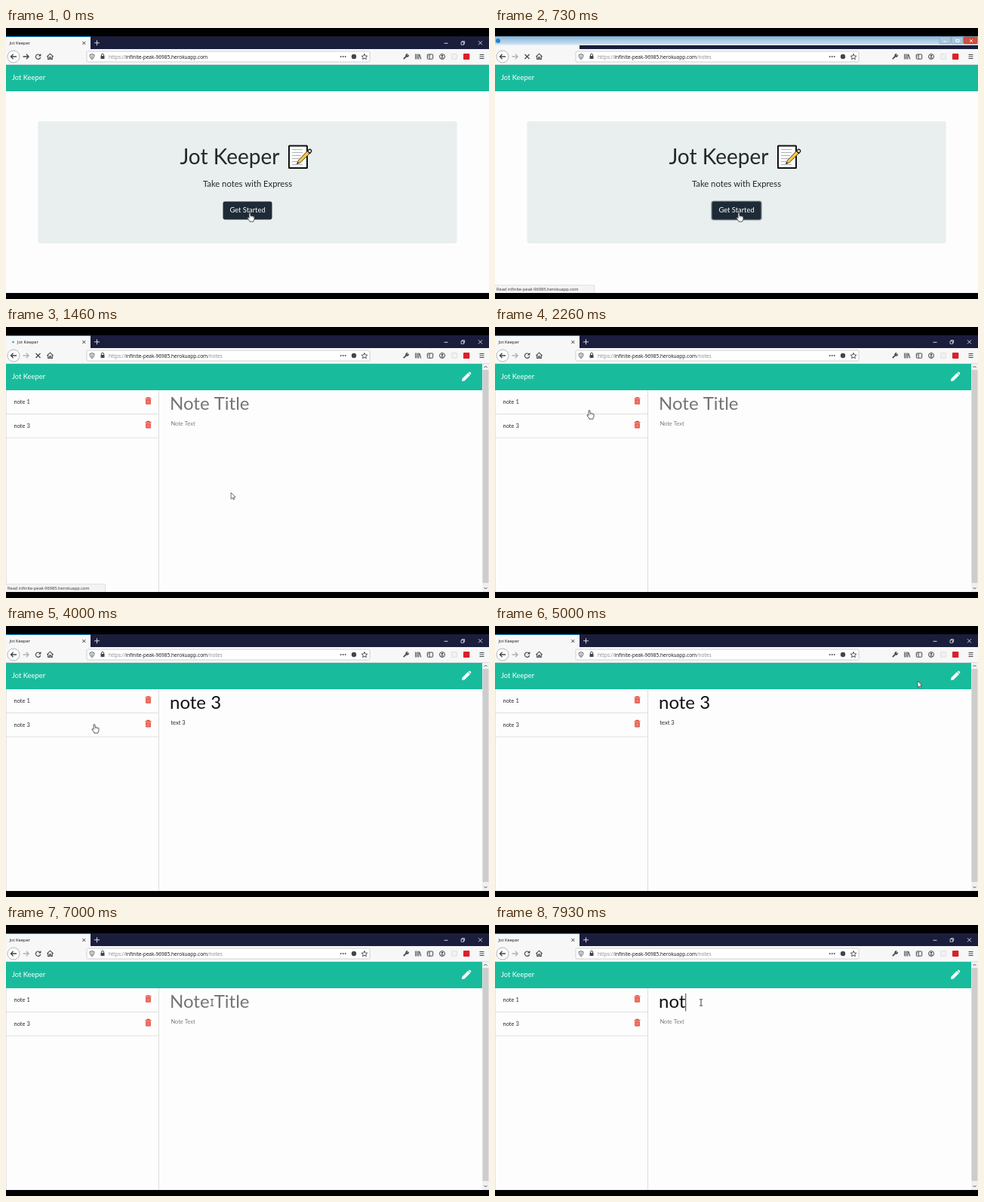
Write an HTML page with a canvas that moves like this. It is 640 by 360 pixels and loops after 8000 ms.

```html
<!DOCTYPE html>
<html lang="en">
<head>
<meta charset="utf-8">
<title>Jot Keeper</title>
<style>
  html, body { margin: 0; width: 100%; height: 100%; overflow: hidden; background: #000; }
  canvas { display: block; width: 640px; height: 360px; }
</style>
</head>
<body>
<canvas id="stage" width="640" height="360"></canvas>
<script>
const ctx = document.getElementById('stage').getContext('2d');
const LOOP = 8000;
const LATO = 'Lato, sans-serif', UI = '"Open Sans", sans-serif';
const APP = 'Jot Keeper', HOST = 'infinite-peak-96985.herokuapp.com';
const INK = '#25282c', ICON = '#45464b', TEAL = '#18bc9c', PAGE = '#fdfdfd';
const TOP = 11, NAV = 49, BODY = 84, BOTTOM = 352;

const ticks = [0, 60, 200, 400, 530, 730, 930, 1130, 1260, 1400, 1600, 1730, 1860, 2060, 2260, 2460, 2530];
for (let k = 20; k < 60; k++) ticks.push(Math.floor(k * 40 / 3 + (k > 39 ? 6.7 : 0)) * 10);

// Pointer hot spot: time, x, y
const path = [
  [0, 323, 246], [730, 323, 246], [930, 322, 233], [1260, 322, 233],
  [1730, 210, 172], [2060, 130, 115], [2260, 125, 111], [2460, 119, 103],
  [2930, 117, 102], [3330, 116, 129], [3600, 117, 131], [4400, 117, 131],
  [4660, 300, 106], [4930, 560, 73], [5060, 609, 64], [5400, 609, 64],
  [5660, 400, 100], [5930, 281, 116], [6330, 273, 103], [8000, 273, 103]
];

function pointerAt(t) {
  const i = path.findIndex(p => p[0] > t);
  const [t0, x0, y0] = path[i - 1], [t1, x1, y1] = path[i];
  const u = (t - t0) / (t1 - t0), e = u * u * (3 - 2 * u);
  return [x0 + (x1 - x0) * e, y0 + (y1 - y0) * e];
}

function rect(x, y, w, h, fill) {
  ctx.fillStyle = fill;
  ctx.fillRect(x, y, w, h);
}

function round(x, y, w, h, r, fill, stroke, width = 1) {
  ctx.beginPath();
  ctx.roundRect(x, y, w, h, r);
  paint(fill, stroke, width);
}

function circle(x, y, r, fill, stroke, width = 1) {
  ctx.beginPath();
  ctx.arc(x, y, r, 0, 7);
  paint(fill, stroke, width);
}

function paint(fill, stroke, width) {
  if (fill) { ctx.fillStyle = fill; ctx.fill(); }
  if (stroke) { ctx.strokeStyle = stroke; ctx.lineWidth = width; ctx.stroke(); }
}

// SVG path placed at x, y
function shape(d, x, y, fill, stroke, width = 1) {
  const p = new Path2D(d);
  ctx.save();
  ctx.translate(x, y);
  if (fill) { ctx.fillStyle = fill; ctx.fill(p); }
  if (stroke) { ctx.strokeStyle = stroke; ctx.lineWidth = width; ctx.stroke(p); }
  ctx.restore();
}

function text(s, x, y, size, color, family = LATO, align = 'left') {
  ctx.font = `${size}px ${family}`;
  ctx.fillStyle = color;
  ctx.textAlign = align;
  ctx.fillText(s, x, y);
  return x + ctx.measureText(s).width;
}

function tabStrip(s) {
  rect(0, TOP, 640, 28 - TOP, '#1b1d3c');
  rect(0, TOP, 112, 28 - TOP, '#f7f7f8');
  if (s.flash) {
    const g = ctx.createLinearGradient(0, TOP, 0, 23);
    g.addColorStop(0, '#7fb0d6');
    g.addColorStop(0.35, '#a3c6e2');
    g.addColorStop(0.8, '#c3daec');
    g.addColorStop(1, '#eaf2f8');
    rect(0, TOP, 640, 12, g);
    circle(4, 17, 3, '#1b86d8');
    round(589, 12, 15, 9, 1, '#a9c6dd', '#7d9db5', 0.6);
    round(605, 12, 15, 9, 1, '#a9c6dd', '#7d9db5', 0.6);
    round(621, 12, 18, 9, 1, '#d0503f', '#98392f', 0.6);
    shape('M-2 1H2', 596, 17, null, '#fff');
    shape('M-2-1.5H2V1.5H-2Z', 613, 17, null, '#fff');
    shape('M-1.7-1.7L1.7 1.7M1.7-1.7L-1.7 1.7', 631, 17, null, '#fff');
    return;
  }
  rect(0, TOP, 112, 1, '#1689d8');
  if (s.loading) circle(9.5, 20, 1.3, '#2a9be6');
  text(APP, s.loading ? 15 : 4.4, 22.2, 5.8, '#16171a', UI);
  shape('M-2-2L2 2M2-2L-2 2', 103.3, 20, null, '#333', 0.9);
  shape('M-3.5 0H3.5M0-3.5V3.5', 120.5, 19.8, null, '#e8e8ee', 0.9);
  shape('M-2.5 0H2.5', 583, 20.3, null, '#fff', 0.8);
  shape('M-2-1H1.5V2.5H-2ZM-.8-1V-2.2H2.6V1.3H1.5', 605, 19.8, null, '#fff', 0.7);
  shape('M-2.5-2.5L2.5 2.5M2.5-2.5L-2.5 2.5', 628.5, 19.8, null, '#fff', 0.8);
}

function toolbar(s) {
  rect(0, 28, 640, NAV - 28, '#f7f7f8');
  rect(0, NAV - 1, 640, 1, '#dcdde0');
  circle(10, 38, 8, '#fff', '#a5a5a9', 0.8);
  shape('M4 0H-3.5M-.4-3.2L-3.6 0L-.4 3.2', 10, 38, null, ICON, 1.3);
  shape('M-4 0H3.5M.4-3.2L3.6 0L.4 3.2', 26.5, 38, null, s.notesUrl ? '#b2b2b6' : ICON, 1.3);
  if (s.loading) {
    shape('M-3-3L3 3M3-3L-3 3', 42.5, 38, null, ICON, 1.2);
  } else {
    shape('M2.7-1.7A3.2 3.2 0 1 0 3.2 1', 42.5, 38, null, ICON, 1.2);
    shape('M3.9-4V-.4H.3Z', 42.5, 38, ICON);
  }
  shape('M-4.2.2L0-3.8L4.2.2M-2.8-.5V3.4H-.8V.8H.8V3.4H2.8V-.5', 58.5, 38, null, ICON, 1.1);

  round(107, 31, 375, 14, 1.5, '#fff', '#c4c4c8', 0.8);
  shape('M0-3.4L2.8-2.4C2.8.5 2 2.4 0 3.6C-2 2.4-2.8.5-2.8-2.4ZM0-2V2.2', 114, 38, null, ICON, 0.9);
  shape('M-1.6-.5V-1.6A1.6 1.6 0 0 1 1.6-1.6V-.5', 128, 37.5, null, ICON, 1);
  round(125.5, 37, 5, 4, 0.6, ICON);
  let x = text('https://', 136, 40.9, 6.55, '#85858a', UI);
  x = text(HOST, x, 40.9, 6.55, '#111114', UI);
  if (s.notesUrl) text('/notes', x, 40.9, 6.55, '#85858a', UI);
  for (const dx of [-3, 0, 3]) circle(446.7 + dx, 38, 0.95, ICON);
  circle(461, 38, 3.2, ICON);
  shape('M0-3.8L1.1-1.2L3.9-1L1.8.8L2.4 3.5L0 2L-2.4 3.5L-1.8.8L-3.9-1L-1.1-1.2Z', 475, 38.2, null, ICON, 0.9);

  shape('M-3.2 3.2L.8-.8', 530, 38, null, ICON, 1.8);
  shape('M.2-.2A2 2 0 0 1 2.3-3.5L1.3-1.8L2-1.2L3.6-2.2A2 2 0 0 1 .2-.2', 530, 38, ICON, ICON, 0.5);
  shape('M-3.3-3.4V3.4M-1.2-3.4V3.4M.9-3.4V3.4M1.9-2.8L3.9 3.3', 546, 38, null, ICON, 1.1);
  round(558.3, 35, 7.4, 6.2, 0.8, null, ICON, 1);
  shape('M-.7-3V3M-2.6-1.4H-1.5M-2.6.2H-1.5', 562, 38, null, ICON, 0.8);
  circle(578, 38, 3.5, null, ICON, 1);
  circle(578, 37, 1.3, ICON);
  shape('M-2.2 2.2A2.3 1.7 0 0 1 2.2 2.2Z', 578, 38, ICON);
  round(590.5, 34.5, 7, 7, 1, '#f1f1f2', '#d6d6d9', 0.7);
  round(606, 34, 8.3, 8, 0.8, '#d9202c');
  shape('M-3-2.5H3M-3 0H3M-3 2.5H3', 630.5, 38, null, ICON, 1);
}

function memoIcon() {
  round(375, 156.5, 24, 29.5, 0.5, '#fff', '#111', 2);
  shape('M0 0H14M0 4H14M0 8H12M0 12H10M0 16H7M0 20H14', 379, 161.5, null, '#a4a7aa', 0.9);
  shape('M0 0L2-4.6L15.6-18.8Q17.2-20 18.6-18.6Q19.8-17.2 18.6-15.6L4.6-1.8Z', 385.5, 180.5, '#f6c844', '#3a3320', 0.9);
  shape('M14-17.1L17-14L18.6-15.6Q19.8-17.2 18.6-18.6Q17.2-20 15.6-18.8Z', 385.5, 180.5, '#e8e4d8', '#111', 1.3);
  shape('M0 0L1.1-2.6L2.6-1.1Z', 385.5, 180.5, '#111');
}

function homePage(s) {
  rect(0, NAV, 640, BODY - NAV, TEAL);
  text(APP, 8, 69, 9.375, '#fff');
  round(42.5, 124, 555, 162, 2, '#e9eeee');
  text(APP, 230.5, 181, 28, INK);
  memoIcon();
  text('Take notes with Express', 320, 211.4, 11.25, INK, LATO, 'center');
  if (s.pressed) round(286.3, 229.5, 67.4, 26, 3.2, '#8f989e');
  round(287.5, 230.5, 65, 24, 2.4, '#1e2b37');
  text('Get Started', 320, 245.2, 9.375, '#fff', LATO, 'center');
}

function trash(y) {
  shape('M-4-3.3H4M-1.5-3.5V-4.5H1.5V-3.5', 188.5, y, null, '#e74c3c', 1.1);
  shape('M-3.4-2.2H3.4V3.7Q3.4 4.6 2.5 4.6H-2.5Q-3.4 4.6-3.4 3.7Z', 188.5, y, '#e74c3c');
  shape('M-1.7-1V3.4M0-1V3.4M1.7-1V3.4', 188.5, y, null, '#f8c5bf', 0.6);
}

function notesPage(s) {
  rect(0, NAV, 631, BODY - NAV, TEAL);
  text(APP, 8, 69, 9.375, '#fff');
  if (s.icons) {
    shape('M-6 6L-5.4 2.5L2-4.9L5-1.9L-2.5 5.5Z', 610, 66, '#fff');
    shape('M2.7-5.5L3.7-6.3Q4.3-6.7 4.9-6.1L6.1-4.9Q6.6-4.3 6.1-3.7L5.5-2.6Z', 610, 66, '#fff');
  } else {
    round(610.3, 60, 5, 8, 0, null, '#a8e3d6', 0.6);
    shape('M-1-2H1V-.5H-1M-1 .8H1V2.3H-1', 612.8, 64, null, '#d5f3ec', 0.6);
  }
  rect(0, BODY, 0.7, BOTTOM - BODY, '#d8d8d8');
  rect(202, BODY, 0.8, BOTTOM - BODY, '#d6d6d6');
  if (s.list) {
    ['note 1', 'note 3'].forEach((name, i) => {
      text(name, 10.5, 102 + i * 31.7, 7.5, INK);
      trash(98.2 + i * 31.7);
      rect(0, 115 + i * 31.7, 202, 0.8, '#dadada');
    });
  }
  const end = text(s.title || 'Note Title', 217, 110, 24, s.title ? '#111' : '#757575');
  text(s.body || 'Note Text', 218.4, 130.8, 7.5, s.body ? '#222' : '#7b7b7b');
  if (s.caret) rect(s.title ? end : 217.5, 91, 0.8, 23.5, '#111');

  rect(631, NAV, 9, BOTTOM - NAV, '#f0f0f0');
  rect(631.5, 57, 8, 283, '#cdcdcd');
  shape('M-2 1L0-1L2 1', 635.5, 53, null, '#555', 1);
  shape('M-2-1L0 1L2-1', 635.5, 347, null, '#555', 1);
}

function statusBar() {
  rect(0, 341.5, 132, BOTTOM - 341.5, '#c9c9cb');
  rect(0, 342, 131.5, BOTTOM - 342, '#f3f3f4');
  text('Read ' + HOST, 2, 349, 5.65, '#333', UI);
}

const cursors = {
  hand(x, y) {
    shape('M-1 4.8V.2Q0-1 1 .2V3.7Q2 3 2.9 3.9Q3.9 3.4 4.6 4.3Q5.7 4 6 5.2V7.6Q5.9 9 4.9 10.3V11.2H-.2V10.3L-2.9 6.8Q-3.2 5.5-1.9 5.6L-1 6.5Z',
      x, y, '#fff', '#333', 0.8);
    shape('M1 4V6M2.9 4.2V6.1M4.6 4.6V6.2', x, y, null, '#666', 0.5);
  },
  arrow(x, y) {
    shape('M0 0V8.5L2 6.7L3.3 9.5L4.6 8.9L3.4 6.2H6Z', x, y, '#fff', '#333', 0.7);
  },
  beam(x, y) {
    shape('M-2-4.2H-.6L0-3.7L.6-4.2H2M0-3.7V3.7M-2 4.2H-.6L0 3.7L.6 4.2H2', x, y, null, '#222', 0.9);
  }
};

function cursorKind(t, x, y) {
  if (t < 930) return 'hand';
  if (t >= 2060 && x < 202 && y > BODY) return 'hand';
  if (x > 600 && y < 76) return 'hand';
  if (t > 4400 && x > 215 && y > 88 && y < 140) return 'beam';
  return 'arrow';
}

function stateAt(t) {
  const during = (a, b) => t >= a && t < b;
  const note = during(2660, 3460) ? 1 : during(3460, 5200) ? 3 : 0;
  const typed = 'not'.slice(0, [7660, 7800, 7930].filter(at => t >= at).length);
  return {
    pressed: t >= 200,
    notesUrl: t >= 530,
    loading: during(400, 1600),
    status: during(530, 1600),
    flash: during(730, 930),
    notesPage: t >= 930,
    icons: t >= 1260,
    list: t >= 1400,
    title: note ? 'note ' + note : typed,
    body: note ? 'text ' + note : '',
    caret: t >= 6460 && (typed !== '' || (t - 6460) % 1000 < 500)
  };
}

function draw(t) {
  const s = stateAt(t);
  rect(0, 0, 640, 360, '#000');
  rect(0, NAV, 640, BOTTOM - NAV, PAGE);
  tabStrip(s);
  toolbar(s);
  (s.notesPage ? notesPage : homePage)(s);
  if (s.status) statusBar();
  const [x, y] = pointerAt(t);
  cursors[cursorKind(t, x, y)](x, y);
}

const start = performance.now();
function frame() {
  const now = (performance.now() - start) % LOOP;
  draw(ticks.findLast(t => t <= now) ?? 0);
  requestAnimationFrame(frame);
}
frame();
</script>
</body>
</html>
```
